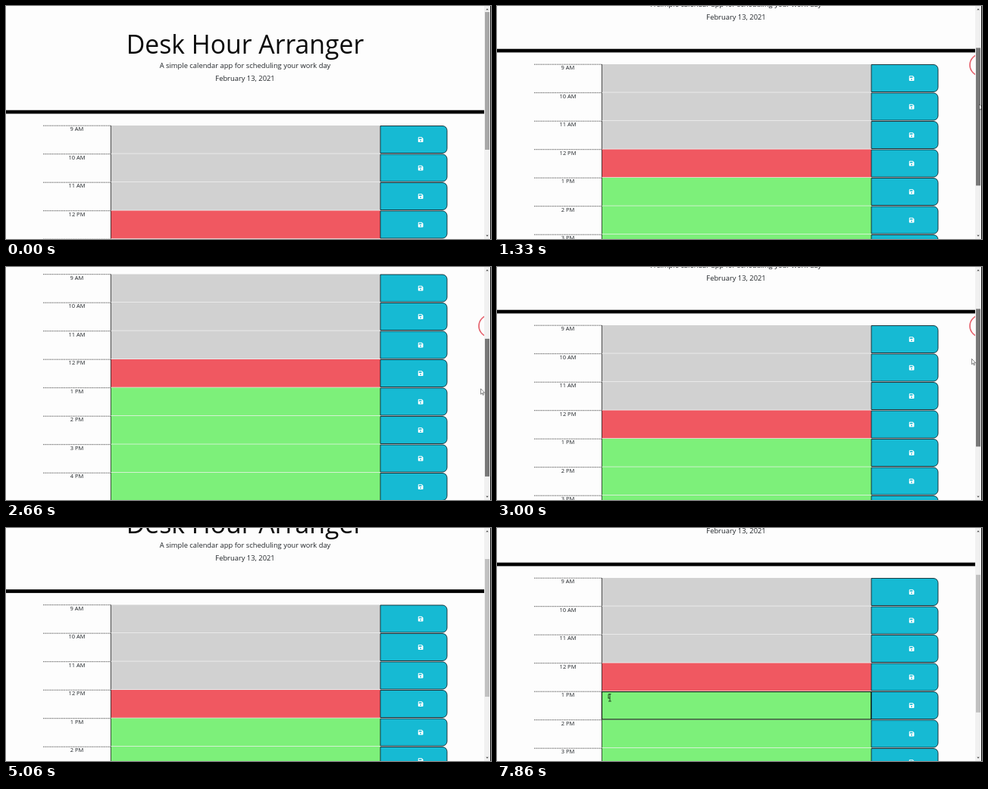
Recreate the animation shown at these times as an HTML page. Size 640 px wide and 308 px high, loop 8000 ms.

```html
<!DOCTYPE html>
<html lang="en">
<head>
<meta charset="utf-8">
<title>Day planner</title>
<style>
  html, body { margin: 0; width: 100%; height: 100%; overflow: hidden; background: #fdfdfd; }
  svg { display: block; width: 100%; height: 100%; }
  text { font-family: "Open Sans", "Noto Sans", sans-serif; text-anchor: middle; fill: #212529; }
  .title { font-size: 33.75px; fill: #0a0a0a; }
  .lead { font-size: 9.375px; }
  .hour { font-size: 7.5px; }
</style>
</head>
<body>
<svg viewBox="0 0 640 308">
  <defs>
    <g id="save">
      <path d="M494 .5H576a6 6 0 0 1 6 6V30.500a6 6 0 0 1-6 6H494Z" fill="#16bad3" stroke="#10282d" stroke-width=".9"/>
      <path d="M544.600 15.300h4.100l1.800 1.800v4.200a.8.8 0 0 1-.8.8h-5.100a.8.8 0 0 1-.8-.8v-5.200a.8.8 0 0 1 .8-.8Z" fill="#fff"/>
      <path d="M544.800 16.300h3.700v1.700h-3.700Z" fill="#16bad3"/>
      <circle cx="547.100" cy="20.100" r=".95" fill="#16bad3"/>
    </g>
  </defs>
  <rect width="640" height="308" fill="#fdfdfd"/>
  <g id="page">
    <text class="title" x="315.500" y="63">Desk Hour Arranger</text>
    <text class="lead" x="315.500" y="82">A simple calendar app for scheduling your work day</text>
    <text class="lead" x="315.500" y="99">February 13, 2021</text>
    <rect y="137.700" width="631" height="4.700"/>
    <g id="rows"></g>
    <g id="focus" fill="none" stroke="#0c1a0c">
      <rect x="138.400" y="308.500" width="355.200" height="36.400" stroke-width="1.100"/>
      <path d="M147 312v5M147 311.500h3.500M149 311.500v9.500M147 321h3.800M146.500 317h2.500" stroke-width=".8"/>
    </g>
  </g>
  <circle id="ring" cx="638.500" cy="78" fill="none" stroke="#e5646f" stroke-width="1.700"/>
  <rect x="631" width="8" height="308" fill="#f1f1f1"/>
  <rect id="thumb" x="632" width="6" height="182"/>
  <path d="M633.300 5.200h3.400l-1.700-2ZM633.300 302.800h3.400l-1.700 2Z" fill="#505050"/>
  <path id="cursor" d="M0 0V7.300L1.700 5.800L2.900 8.500L4 8L2.800 5.400H5.100Z" fill="#fff" stroke="#333" stroke-width=".6"/>
  <rect x="639" width="1" height="308" fill="#0a0a0a"/>
</svg>
<script>
const $ = id => document.getElementById(id);
const LOOP = 8000, STEP = 200 / 3, ROW = 37.5, TOP = 158;
const PRESS = 1, RELEASE = 52, FOCUS = 84;

// Each track is a list of [step, value]
const scrollTrack = [[15, 0], [20, 81], [25, 169.5], [27, 187], [32, 187], [40, 148.5], [51, 0],
  [53, 0], [54, 11.5], [55, 27], [56, 39], [57, 45], [75, 45], [76, 56.5], [77, 73], [78, 86], [79, 92]];
const cursorX = [[15, 637], [20, 636.5], [25, 626.5]];
const cursorGap = [[15, 75], [25, 74], [32, 74], [40, 66]];

function sample(track, k) {
  const i = track.findIndex(p => p[0] >= k);
  if (i < 0) return track[track.length - 1][1];
  if (i === 0) return track[0][1];
  const [a, u] = track[i - 1], [b, v] = track[i];
  return u + (v - u) * (k - a) / (b - a);
}

function rowMarkup(i) {
  const hour = 9 + i;
  const label = (hour > 12 ? hour - 12 : hour) + (hour < 12 ? ' AM' : ' PM');
  const fill = hour < 12 ? '#d1d1d1' : hour === 12 ? '#f05861' : '#7df07a';
  return `<g transform="translate(0 ${TOP + i * ROW})">
    <path d="M49 .2H138" stroke="#333" stroke-width=".8" stroke-dasharray="1.400 .9"/>
    <text class="hour" x="93.500" y="7.200">${label}</text>
    <rect x="138" width="356" height="37.500" fill="${fill}"/>
    <path d="M138 37.200H494" stroke="#f4f4f4" stroke-width=".9"/>
    <path d="M138.400 0V37" stroke="#222" stroke-width=".8"/>
    <use href="#save"/></g>`;
}
$('rows').innerHTML = Array.from({ length: 9 }, (_, i) => rowMarkup(i)).join('');

function show(el, on) { el.setAttribute('visibility', on ? 'visible' : 'hidden'); }

function draw(t) {
  const k = Math.floor((t + 7) / STEP);
  const scroll = sample(scrollTrack, k);
  const thumbY = 8 + scroll * 0.585;
  const held = k >= PRESS && k < RELEASE;

  $('page').setAttribute('transform', `translate(0 ${-scroll})`);
  $('thumb').setAttribute('y', thumbY);
  $('thumb').setAttribute('fill', held ? '#787878' : k < PRESS ? '#a8a8a8' : '#c1c1c1');
  $('ring').setAttribute('r', 14.5 * Math.min(1, Math.max(0, k / 5)));
  $('cursor').setAttribute('transform', `translate(${sample(cursorX, k)} ${thumbY + sample(cursorGap, k)})`);
  show($('ring'), held);
  show($('cursor'), held);
  show($('focus'), k >= FOCUS);
}

const start = performance.now();
function tick() {
  draw((performance.now() - start) % LOOP);
  requestAnimationFrame(tick);
}
tick();
</script>
</body>
</html>
```
